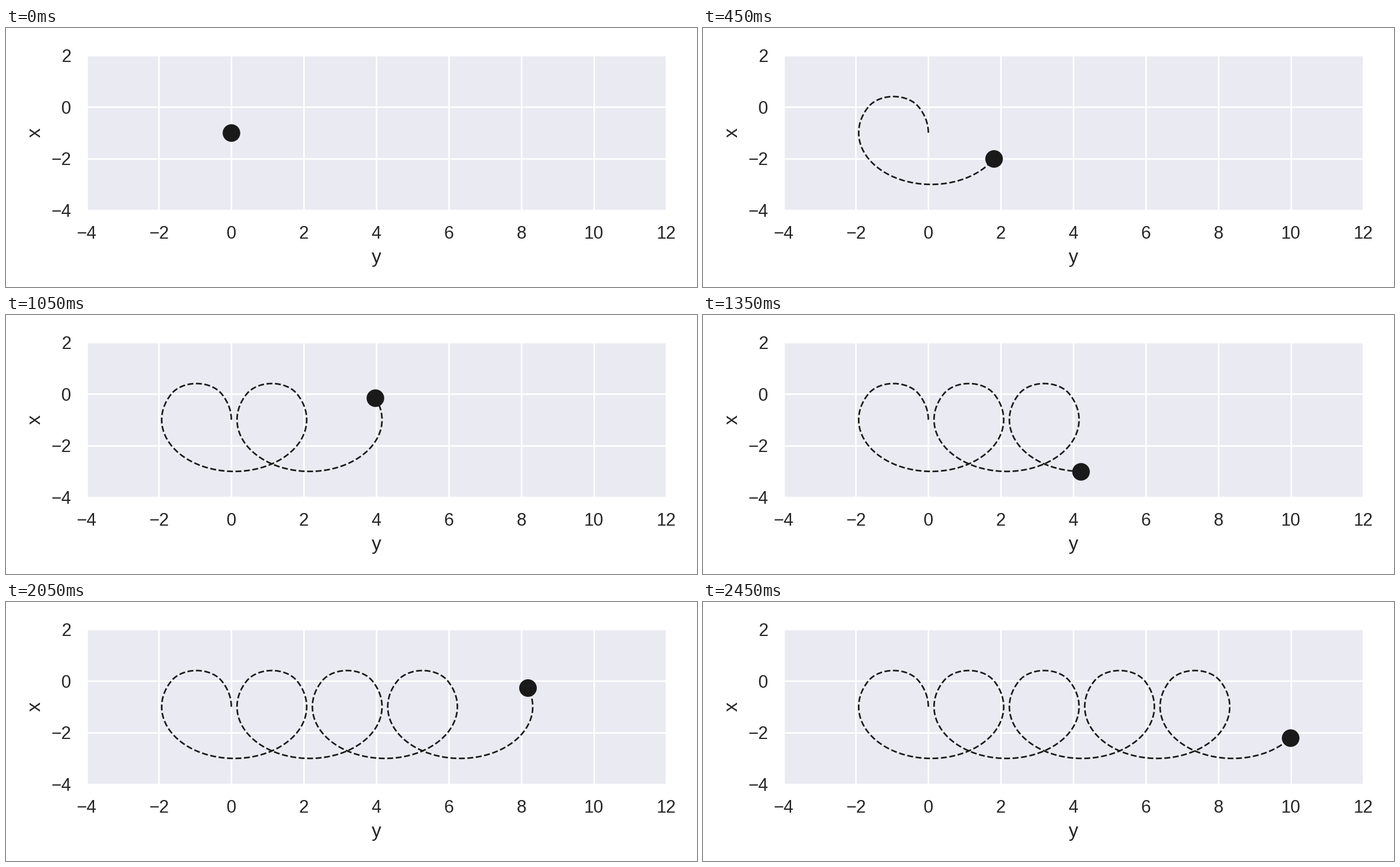
These frames come from a looping animation (1200 by 450 pixels, 2500 ms). A matplotlib script:

```python
import numpy as np
import matplotlib.pyplot as plt
from matplotlib.animation import FuncAnimation

# A charged particle drifting along a step in the magnetic field at x = 0
FRAMES, INTERVAL = 50, 50
SPEED = 0.9993           # path length per frame
R_LOW, R_HIGH = 2.0, 0.8  # gyroradii below and above the step
INK, TEXT, PANEL = "#1a1a1a", "#262626", "#eaeaf2"

ENTRY = np.pi / 6        # turning angle where the orbit meets x = 0
SHIFT = (R_LOW - R_HIGH) * np.cos(ENTRY)
DRIFT = 2 * SHIFT
T_UP = R_LOW * ENTRY
T_DOWN = T_UP + R_HIGH * (np.pi - 2 * ENTRY)
PERIOD = T_DOWN + R_LOW * (np.pi + ENTRY)

# Stage size and panel edges in pixels
W, H = 1200, 450
LEFT, RIGHT, TOP, BOTTOM = 139.5, 1146.8, 47.2, 316.7

plt.rcParams.update({
    "font.family": "Liberation Sans",
    "axes.unicode_minus": True,
    "axes.facecolor": PANEL,
    "axes.edgecolor": "white",
    "axes.linewidth": 1.25,
    "axes.axisbelow": True,
    "axes.grid": True,
    "axes.labelcolor": TEXT,
    "axes.labelsize": 12,
    "grid.color": "white",
    "grid.linewidth": 1,
    "xtick.color": TEXT, "ytick.color": TEXT,
    "xtick.labelsize": 11, "ytick.labelsize": 11,
    "xtick.major.size": 6, "ytick.major.size": 6,
    "xtick.bottom": False, "ytick.left": False,
})


def orbit(s):
    """Horizontal and vertical position after path length s."""
    turns, s = np.divmod(s, PERIOD)
    parts = [s < T_UP, s < T_DOWN]
    angle = np.select(parts, [s / R_LOW, ENTRY + (s - T_UP) / R_HIGH],
                      np.pi - ENTRY + (s - T_DOWN) / R_LOW)
    radius = np.select(parts, [R_LOW, R_HIGH], R_LOW)
    cx = np.select(parts, [-R_LOW, -R_LOW + SHIFT], -R_LOW + DRIFT)
    cy = np.select(parts, [-1.0, -R_HIGH * np.sin(ENTRY)], -1.0)
    return (cx + radius * np.cos(angle) + turns * DRIFT,
            cy + radius * np.sin(angle))


fig = plt.figure(figsize=(W / 200, H / 200), dpi=200, facecolor="white")
ax = fig.add_axes([LEFT / W, 1 - BOTTOM / H,
                   (RIGHT - LEFT) / W, (BOTTOM - TOP) / H])
ax.set(xlim=(-4, 12), ylim=(-4, 2), xlabel="y", ylabel="x",
       xticks=range(-4, 13, 2), yticks=range(-4, 3, 2))
trail, = ax.plot([], [], "--", color=INK, lw=1)
dot, = ax.plot([], [], "o", color=INK, ms=10)


def update(i):
    x, y = orbit(np.linspace(0, SPEED * i, 25 * i + 1))
    trail.set_data(x, y)
    dot.set_data(x[-1:], y[-1:])
    return trail, dot


anim = FuncAnimation(fig, update, frames=FRAMES, interval=INTERVAL,
                     repeat=True, repeat_delay=0)
plt.show()
```
